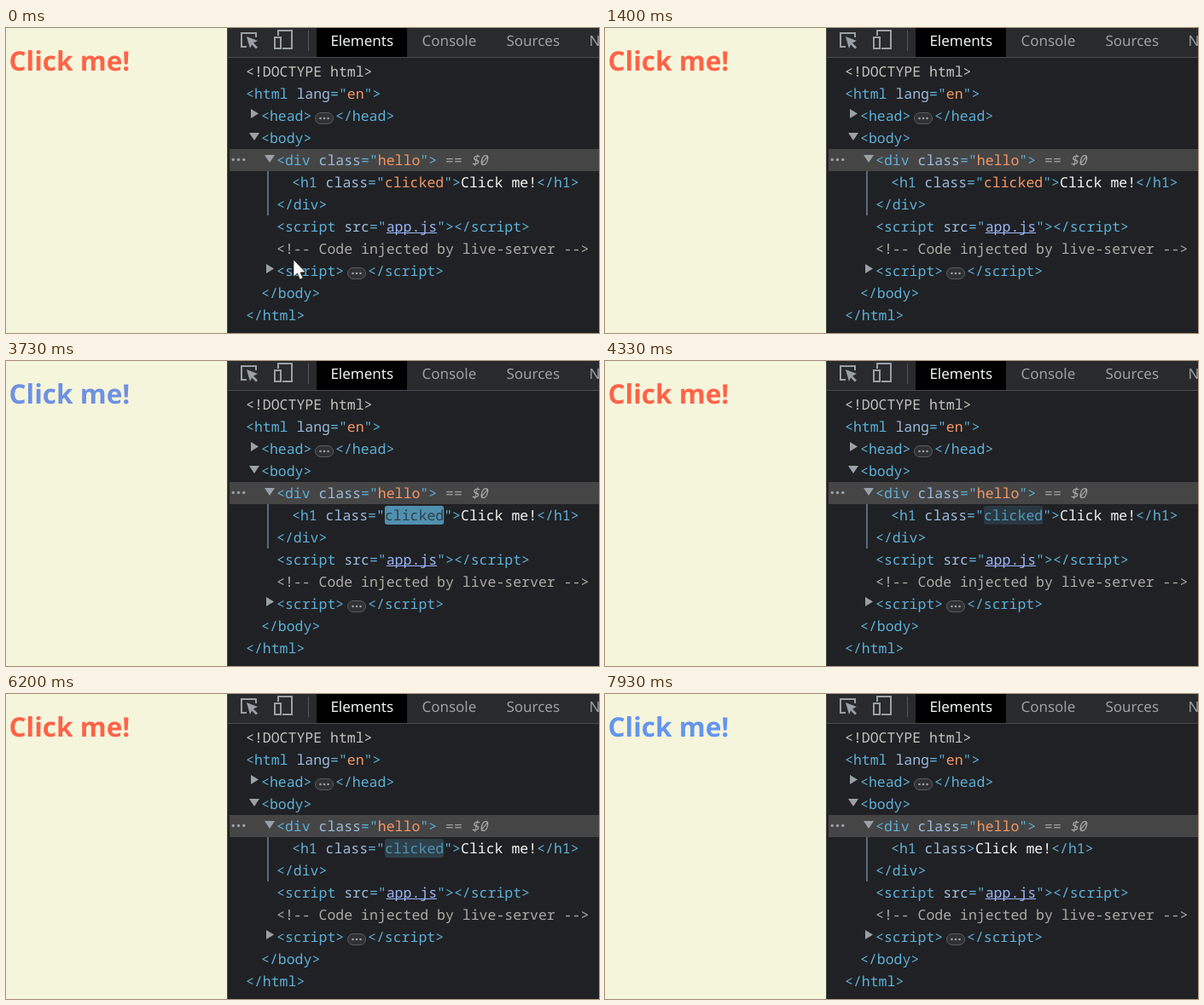
Write an HTML page with a canvas that moves like this. It is 695 by 358 pixels and loops after 7990 ms.

```html
<!DOCTYPE html>
<html lang="en">
<head>
<meta charset="utf-8">
<title>Class toggle</title>
<style>
html, body { margin: 0; width: 100%; height: 100%; overflow: hidden; background: #202124; }
canvas { display: block; }
</style>
</head>
<body>
<canvas id="stage" width="695" height="358"></canvas>
<script>
const ctx = document.getElementById('stage').getContext('2d');
const LOOP = 7990;
const STEP = 200 / 3;
const CELL = 9.9;
const MONO = '500 16.5px "Noto Sans Mono", monospace';
const SANS = '17px "Noto Sans", sans-serif';
const TITLE = '700 31.5px "Open Sans", sans-serif';

const TAG = '#5db0d7', ATTR = '#9bbbdc', VALUE = '#f29766', TEXT = '#f4f4f4', LINK = '#9ab6f8';
const ICON = '#9aa0a6', BORDER = '#494c50';
const TOMATO = [255, 99, 71], BLUE = [100, 149, 237];
const FLASH = [93, 176, 215], PANEL = [32, 33, 36];

const CLICKS = [2480, 3640, 4600, 5600, 6520];
const FADE = 500;
const FLASH_TIME = 1400;

function bezier(x1, y1, x2, y2) {
  const at = (a, b, s) => 3 * (1 - s) * (1 - s) * s * a + 3 * (1 - s) * s * s * b + s * s * s;
  return x => {
    if (x <= 0) return 0;
    if (x >= 1) return 1;
    let lo = 0, hi = 1;
    for (let i = 0; i < 24; i++) {
      const mid = (lo + hi) / 2;
      if (at(x1, x2, mid) < x) lo = mid; else hi = mid;
    }
    return at(y1, y2, lo);
  };
}
const easeInOut = bezier(0.42, 0, 0.58, 1);
const flashEase = bezier(0, 0, 0.2, 1);
const mix = (a, b, p) => `rgb(${a.map((v, i) => Math.round(v + (b[i] - v) * p))})`;

function rect(x, y, w, h, color) {
  ctx.fillStyle = color;
  ctx.fillRect(x, y, w, h);
}

function round(x, y, w, h, r, fill, stroke) {
  ctx.beginPath();
  ctx.roundRect(x, y, w, h, r);
  if (fill) { ctx.fillStyle = fill; ctx.fill(); }
  if (stroke) { ctx.strokeStyle = stroke; ctx.lineWidth = 1; ctx.stroke(); }
}

function poly(points, fill) {
  ctx.beginPath();
  points.forEach(([x, y]) => ctx.lineTo(x, y));
  ctx.closePath();
  ctx.fillStyle = fill;
  ctx.fill();
}

function dots(x, y, gap, r, color) {
  ctx.fillStyle = color;
  for (let i = -1; i <= 1; i++) {
    ctx.beginPath();
    ctx.arc(x + i * gap, y, r, 0, 7);
    ctx.fill();
  }
}

function label(text, x, y, font, color) {
  ctx.font = font;
  ctx.fillStyle = color;
  ctx.fillText(text, x, y);
}

const rowY = row => 51 + 26 * row;

// Draws [text, color] pairs one after another on the character grid.
function code(row, x, ...parts) {
  for (const [text, color, style = ''] of parts) {
    label(text, x, rowY(row) + 6, style + MONO, color);
    x += text.length * CELL;
  }
}

function arrow(row, x, open) {
  const y = rowY(row);
  poly(open ? [[x, y - 6], [x + 12, y - 6], [x + 6, y + 3]]
            : [[x, y - 8], [x + 9, y - 2.5], [x, y + 3]], ICON);
}

function pill(row, x) {
  const y = rowY(row);
  round(x + 0.5, y - 3.5, 21, 13, 6.5, '#303134', '#5a5d61');
  dots(x + 11, y + 3, 4.5, 1.3, ICON);
}

function toolbar() {
  rect(260, 0, 435, 34, '#292a2d');
  rect(260, 34, 435, 1, BORDER);
  rect(364, 0, 106, 34, '#000');
  rect(354, 3, 1, 24, '#55585c');

  ctx.strokeStyle = ICON;
  ctx.lineWidth = 2;
  ctx.beginPath();
  ctx.moveTo(282, 22);
  ctx.lineTo(276, 22);
  ctx.lineTo(276, 6);
  ctx.lineTo(293, 6);
  ctx.lineTo(293, 11);
  ctx.stroke();
  poly([[282, 10], [295, 15], [290, 17.5], [295, 22.5], [293, 24.5], [288, 19.5], [286, 24]], ICON);

  ctx.strokeRect(319, 3, 16, 21);
  rect(313, 9, 11, 17, '#292a2d');
  ctx.strokeRect(315, 11, 7, 13);

  label('Elements', 380.4, 21, SANS, '#f1f3f4');
  label('Console', 487.4, 21, SANS, ICON);
  label('Sources', 586.4, 21, SANS, ICON);
  label('Network', 683.4, 21, SANS, ICON);
}

function tree() {
  rect(262, 142, 433, 26, '#454545');
  rect(306, 168, 2, 52, '#5a6b7d');
  dots(272.5, 154.5, 6.3, 1.7, ICON);

  code(0, 281, ['<!DOCTYPE html>', '#c4c3be']);
  code(1, 281, ['<html ', TAG], ['lang', ATTR], ['="', TAG], ['en', VALUE], ['">', TAG]);
  arrow(2, 287, false);
  code(2, 299, ['<head>', TAG]);
  pill(2, 362);
  code(2, 386, ['</head>', TAG]);
  arrow(3, 285, true);
  code(3, 299, ['<body>', TAG]);
  arrow(4, 303, true);
  code(4, 317, ['<div ', TAG], ['class', ATTR], ['="', TAG], ['hello', VALUE], ['">', TAG],
    [' == ', '#a0a0a0'], ['$0', '#a8a8a8', 'italic ']);
  code(6, 317, ['</div>', TAG]);
  code(7, 317, ['<script ', TAG], ['src', ATTR], ['="', TAG], ['app.js', LINK],
    ['"></' + 'script>', TAG]);
  rect(317 + 13 * CELL, 240, 6 * CELL, 1, LINK);
  code(8, 317, ['<!-- Code injected by live-server -->', '#acaaa5']);
  arrow(9, 305, false);
  code(9, 317, ['<script>', TAG]);
  pill(9, 400);
  code(9, 424, ['</' + 'script>', TAG]);
  code(10, 299, ['</body>', TAG]);
  code(11, 281, ['</html>', TAG]);
}

function heading(clicked, age) {
  const x = 335;
  const end = [['Click me!', TEXT], ['</h1>', TAG]];
  const flashing = age < FLASH_TIME;
  const p = flashEase(age / FLASH_TIME);
  const fresh = normal => flashing ? mix(PANEL, FLASH, p) : normal;

  if (flashing) {
    const start = clicked ? 11 : 4, length = clicked ? 7 : 5;
    round(x + start * CELL, 170, length * CELL, 22, 3, mix(FLASH, PANEL, p));
  }
  if (clicked) {
    code(5, x, ['<h1 ', TAG], ['class', ATTR], ['="', TAG],
      ['clicked', fresh(VALUE)], ['">', TAG], ...end);
  } else {
    code(5, x, ['<h1 ', TAG], ['class', fresh(ATTR)], ['>', TAG], ...end);
  }
}

function pointer(t) {
  if (t > 500) return;
  const u = Math.max(0, (t - 200) / (4 * STEP));
  const x = t < 60 ? 337 : 332 - 307 * u;
  const y = t < 60 ? 272 : 292 + 17 * u;
  ctx.save();
  ctx.translate(x, y);
  poly([[0, 0], [0, 20], [4.5, 16], [7.5, 23], [11, 21.5], [8, 15], [14, 14.5]], '#fff');
  ctx.strokeStyle = '#222';
  ctx.lineWidth = 0.7;
  ctx.stroke();
  ctx.restore();
}

function draw(t) {
  const count = CLICKS.filter(c => c <= t).length;
  const clicked = count % 2 === 0;
  const age = count ? t - CLICKS[count - 1] : Infinity;
  const p = easeInOut(age / FADE);

  ctx.textRendering = 'geometricPrecision';
  rect(0, 0, 695, 358, '#202124');
  rect(0, 0, 259, 358, '#f5f5dc');
  rect(259, 0, 1, 358, BORDER);
  label('Click me!', 3.5, 50, TITLE, clicked ? mix(BLUE, TOMATO, p) : mix(TOMATO, BLUE, p));
  toolbar();
  tree();
  heading(clicked, age);
  pointer(t);
}

// The screen is sampled 15 times a second.
const begin = performance.now();
function tick() {
  const t = (performance.now() - begin) % LOOP;
  draw(Math.floor((t + 5) / STEP) * STEP);
  requestAnimationFrame(tick);
}
tick();
</script>
</body>
</html>
```
